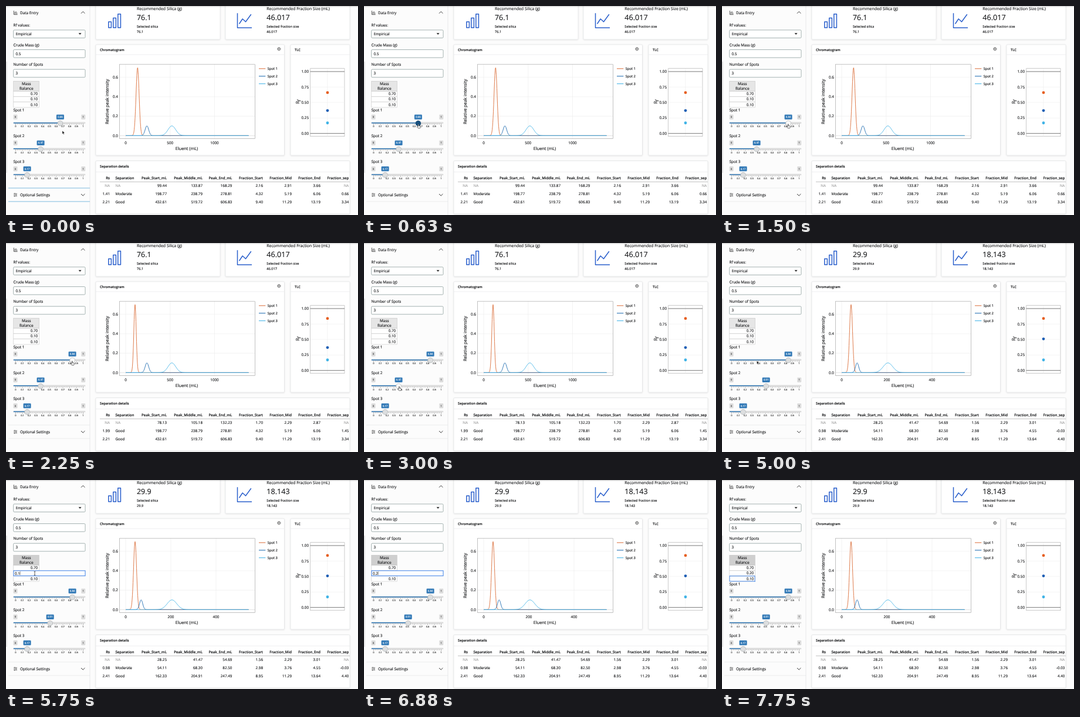
Animation of 600x357 px, one loop 8000 ms. Source, as an HTML page:

```html
<!DOCTYPE html>
<html lang="en">
<head>
<meta charset="utf-8">
<title>Chromatogram dashboard</title>
<style>
html, body { margin: 0; width: 100%; height: 100%; overflow: hidden; background: #fcfcfc; }
svg { display: block; width: 600px; height: 357px; font-family: "Open Sans", "Noto Sans", sans-serif; }
text { text-rendering: geometricPrecision; stroke-width: .14px; }
</style>
</head>
<body>
<svg id="stage" viewBox="0 0 600 357" xmlns="http://www.w3.org/2000/svg"></svg>
<script>
const LOOP = 8000;
const INK = '#17181a', BLUE = '#2b60cc', SLIDER = '#337ab7', FOCUS = '#4b89e8';
const COLORS = ['#dd7745', '#2470b3', '#45b5e8'];
const DOTS = ['#e65f1e', '#1f5fb5', '#3fb3e6'];
const HEIGHTS = [0.7, 0.1, 0.1];

// Markup helpers
const text = (x, y, s, size = 6.4, extra = '', color = INK) =>
  `<text x="${x}" y="${y}" font-size="${size}" fill="${color}" stroke="${color}" ${extra}>${s}</text>`;
const rect = (x, y, w, h, fill, extra = '') =>
  `<rect x="${x}" y="${y}" width="${w}" height="${h}" fill="${fill}" ${extra}/>`;
const line = (x1, y1, x2, y2, color, w = 0.6) =>
  `<path d="M${x1} ${y1}L${x2} ${y2}" stroke="${color}" stroke-width="${w}"/>`;
const path = (d, color, w = 1, extra = '') =>
  `<path d="${d}" fill="none" stroke="${color}" stroke-width="${w}" ${extra}/>`;
const circle = (x, y, r, fill, extra = '') =>
  `<circle cx="${x}" cy="${y}" r="${r}" fill="${fill}" ${extra}/>`;
const END = 'text-anchor="end"', MID = 'text-anchor="middle"', SEMI = 'font-weight="600"';

// Results for each set of slider values
const thirdRow = ['2.21', 'Good', 432.61, 519.72, 606.83, 9.40, 11.29, 13.19, '3.34'];
const first = {
  silica: '76.1', size: '46.017', rf: [0.66, 0.37, 0.17], scale: 0.1515, tick: 500,
  rows: [
    ['NA', 'NA', 99.44, 133.87, 168.29, 2.16, 2.91, 3.66, 'NA'],
    ['1.41', 'Moderate', 198.77, 238.79, 278.81, 4.32, 5.19, 6.06, '0.66'],
    thirdRow
  ]
};
const second = {
  ...first, rf: [0.84, 0.37, 0.17],
  rows: [
    ['NA', 'NA', 78.13, 105.18, 132.23, 1.70, 2.29, 2.87, 'NA'],
    ['1.99', 'Good', 198.77, 238.79, 278.81, 4.32, 5.19, 6.06, '1.45'],
    thirdRow
  ]
};
const third = {
  silica: '29.9', size: '18.143', rf: [0.84, 0.51, 0.17], scale: 0.385, tick: 200,
  rows: [
    ['NA', 'NA', 28.25, 41.47, 54.69, 1.56, 2.29, 3.01, 'NA'],
    ['0.98', 'Moderate', 54.11, 68.30, 82.50, 2.98, 3.76, 4.55, '-0.03'],
    ['2.41', 'Good', 162.33, 204.91, 247.49, 8.95, 11.29, 13.64, '4.40']
  ]
};

const COLUMNS = [
  ['Rs', 177], ['Separation', 186.5], ['Peak_Start_mL', 274], ['Peak_Middle_mL', 335],
  ['Peak_End_mL', 385.3], ['Fraction_Start', 438], ['Fraction_Mid', 487],
  ['Fraction_End', 536], ['Fraction_sep', 584.3]
];

function card(x, y, w, h, title, head = 17) {
  let s = rect(x, y, w, h, '#fff', 'rx="1.5" stroke="#dcdddf" stroke-width=".6" filter="url(#soft)"');
  if (title) s += line(x, y + head, x + w, y + head, '#e4e5e7') + text(x + 7, y + 11.2, title, 5.7, SEMI);
  return s;
}

function field(y, value) {
  return rect(12.7, y, 122.3, 13.6, '#fff', 'rx="1.5" stroke="#7f9391" stroke-width=".7"') +
    text(16.5, y + 9.1, value, 6.3);
}

function gear(x, y) {
  return circle(x, y, 2.1, 'none', 'stroke="#555" stroke-width=".8"') + circle(x, y, 0.8, '#555') +
    circle(x, y, 2.8, 'none', 'stroke="#555" stroke-width=".8" stroke-dasharray="1.1 1.1"');
}

const dividers = (color, w) => line(4, 311, 143, 311, color, w) + line(4, 334, 143, 334, color, w);

function sidebar() {
  return rect(0, 0, 143, 357, '#fcfcfc') + line(143, 0, 143, 357, '#d9dbdd') +
    rect(0, 95, 3, 190, 'url(#edge)') +
    path('M13.4 8v6.6h6.2M15.2 13.4v-3M17 13.4V9M18.7 13.4v-2', '#444', 0.9) +
    text(24, 13.7, 'Data Entry') +
    path('M128 12.7L131.2 9.5L134.4 12.7', '#222', 0.9) +
    text(12.5, 35, 'Rf values:') + field(41, 'Empirical') +
    '<path d="M123.6 46.2h5l-2.5 2.9z" fill="#222"/>' +
    text(12.5, 68.5, 'Crude Mass (g)') + field(74.6, '0.5') +
    text(12.5, 102.3, 'Number of Spots') + field(108.2, '3') +
    dividers('#e0e2e3', 0.6) +
    path('M13 320.4h6M13 322.6h6M13 324.8h6M15 319.4v2M17.3 321.6v2M14.6 323.8v2', '#444', 0.7) +
    text(24, 325, 'Optional Settings') +
    path('M128 321L131.2 324.2L134.4 321', '#222', 0.9);
}

function board() {
  let s = card(153, -20, 212, 77) + card(374, -20, 212, 77) +
    card(153, 66, 321.5, 189, 'Chromatogram') + card(485, 66, 101, 189, 'TLC') +
    card(153, 264.5, 433, 90.5, 'Separation details', 19) +
    text(223, 7.3, 'Recommended Silica (g)', 6.95) + text(444.3, 7.3, 'Recommended Fraction Size (mL)', 6.95) +
    text(223, 37.2, 'Selected silica', 5.65, 'font-weight="500"') +
    text(444.3, 37.2, 'Selected fraction size', 5.65, 'font-weight="500"') +
    path('M174.8 27h4.6v10h-4.6zM182.8 20.5h4.6v16.5h-4.6zM190.8 13.8h4.6v23.2h-4.6z', BLUE, 1.5, 'stroke-linejoin="round"') +
    path('M394.5 12.2V37.2H419M397.5 30.5L403.2 22L408.5 27L417.8 14.2', BLUE, 1.5, 'stroke-linejoin="round"') +
    gear(465.3, 73.4);

  // Chromatogram frame
  s += rect(193.3, 99.8, 231, 126.8, '#fff');
  for (let i = 0; i < 4; i++) {
    const y = 221.4 - 33.2 * i;
    s += line(193.3, y, 424.3, y, i ? '#ebebeb' : '#cfcfcf') + text(190.8, y + 2.2, (i / 5).toFixed(1), 6.3, END);
  }
  s += text(308, 245.8, 'Eluent (mL)', 7.3, MID) +
    text(0, 0, 'Relative peak intensity', 7.45, MID + ' transform="translate(174.8 163.4) rotate(-90)"');
  COLORS.forEach((c, i) => {
    const y = 107 + 12.9 * i;
    s += line(431, y, 442.3, y, c, 1.1) + text(445.8, y + 2.1, `Spot ${i + 1}`, 5.8);
  });

  // TLC plate frame
  s += rect(518.7, 106.7, 58.3, 116, '#fff', 'stroke="#a9a9a9" stroke-width=".6"') +
    line(548, 107, 548, 222.5, '#ececec');
  for (let i = 0; i <= 4; i++) {
    const y = plateY(i / 4), edge = i % 4 === 0;
    s += line(518.7, y, 577, y, edge ? '#555' : '#ececec', edge ? 0.8 : 0.6) +
      text(516, y + 2.2, (i / 4).toFixed(2), 6.3, END);
  }
  s += text(0, 0, 'R<tspan dy="1.5" font-size="6.2" font-style="italic">f</tspan>', 8.2,
    MID + ' transform="translate(499.8 163.8) rotate(-90)"');

  // Table head
  COLUMNS.forEach(([name, x], i) => { s += text(x, 295.6, name, 6.1, SEMI + (i === 1 ? '' : ' ' + END)); });
  return s + line(160, 300.4, 586, 300.4, '#999');
}

const plateY = v => 217.7 - 105.7 * v;

function results(d) {
  let s = text(223, 24.2, d.silica, 12.4) + text(444.3, 24.2, d.size, 12.6) +
    text(223, 45.6, d.silica, 5.7, 'font-weight="500"') + text(444.3, 45.6, d.size, 5.7, 'font-weight="500"');
  for (let i = 0; i < 3; i++) {
    const x = 204 + d.tick * i * d.scale;
    s += line(x, 99.8, x, 226.6, '#ebebeb') + text(x, 236, d.tick * i, 6.3, MID);
  }
  d.rows.forEach((row, i) => {
    const mid = row[3], sigma = (row[4] - row[2]) / 4;
    let p = '';
    for (let x = 0; x <= 209.5; x += 0.5) {
      const z = (x / d.scale - mid) / sigma;
      p += `${x ? 'L' : 'M'}${204 + x} ${(221.4 - 166 * HEIGHTS[i] * Math.exp(-z * z / 2)).toFixed(2)}`;
    }
    s += path(p, COLORS[i], 0.95, 'stroke-linejoin="round"') + circle(548, plateY(d.rf[i]), 2.4, DOTS[i]);
    row.forEach((v, k) => {
      const label = typeof v === 'number' ? v.toFixed(2) : v;
      s += text(COLUMNS[k][1], 309.4 + 13.7 * i, label, 6.25, k === 1 ? '' : END, label === 'NA' ? '#a3a3a3' : INK);
    });
  });
  return s + rect(193.3, 99.8, 231, 126.8, 'none', 'stroke="#999" stroke-width=".6"');
}

function slider(i, value, state) {
  const y = 199.7 + 44.2 * i, x = 16.5 + 115 * value;
  const tag = (cx, w, label, fill, ink) =>
    rect(cx - w / 2, y - 14.2, w, 8.3, fill, 'rx="1.2"') + text(cx, y - 8.5, label, 4.3, MID, ink);
  let s = text(12.5, y - 19.7, `Spot ${i + 1}`) +
    tag(16, 7, '0', '#dcdcdc', '#444') + tag(131.7, 7, '1', '#dcdcdc', '#444') +
    tag(x, 13, value.toFixed(2), SLIDER, '#fff') +
    rect(12.7, y - 0.9, 122.3, 1.7, '#e6e6e6', 'rx=".8" stroke="#b5b5b5" stroke-width=".4"') +
    rect(12.7, y - 0.8, x - 12.7, 1.5, SLIDER, 'rx=".7"');
  let ticks = '';
  for (let k = 0; k <= 40; k++) ticks += `M${16.5 + 2.875 * k} ${y + 1.2}v${k % 4 ? 1.5 : 2.6}`;
  s += path(ticks, '#444', 0.45);
  for (let k = 0; k <= 10; k++) s += text(16.5 + 11.5 * k, y + 7.6, k / 10, 4, MID, '#333');
  const fill = { idle: '#dcdedf', hover: '#fbfbfb', press: '#17507f' }[state];
  return s + circle(x, y + 0.6, 4.4, fill, `stroke="${state === 'press' ? '#123f66' : '#a5a8aa'}" stroke-width=".6"`);
}

function massTable(t) {
  const active = t >= 5250;
  const vals = ['0.70', t < 7500 ? '0.10' : '0.20', '0.10'];
  let s = rect(12.8, 128.5, 43.4, 17.3, active ? '#cfcfcf' : '#e6e6e6', 'stroke="#b9b9b9" stroke-width=".5"') +
    text(34.8, 135.1, 'Mass', 6.4, MID) + text(34.8, 142.8, 'Balance', 6.4, MID);
  s += vals.map((v, i) =>
    rect(12.8, 145.8 + 9.1 * i, 43.4, 9.1, '#fff', 'stroke="#bdbdbd" stroke-width=".5"') +
    text(54.2, 152.3 + 9.1 * i, v, 6.3, END)).join('');
  const select = y => rect(13, y, 43, 9, 'none', `stroke="${FOCUS}" stroke-width="1"`) +
    rect(55, y + 7.8, 2, 2, FOCUS, 'stroke="#fff" stroke-width=".3"');
  if (t >= 7500) s += select(164);
  else if (t >= 5500) {
    const typed = t < 5880 ? '0.1' : t < 6380 ? '0.' : '0.2';
    s += rect(13, 154.9, 122, 8.8, '#fff', `stroke="${FOCUS}" stroke-width="1.1"`) + text(15, 161.5, typed, 6.3);
    const x = typed === '0.' ? 20.5 : 24.2;
    if ((t - 5500) % 1000 < 500) s += line(x, 156.2, x, 162.4, '#111', 0.5);
  } else if (active) s += select(155);
  return s;
}

// Pointer: [time, x, y]
const MOVES = [
  [130, 96, 213], [480, 92.8, 201.7], [850, 92.8, 201.7], [1350, 112.8, 201.7],
  [2250, 112.8, 201.7], [2750, 60, 245], [3200, 60, 245], [3650, 75, 245],
  [3900, 75, 245], [4200, 74, 260], [4750, 74, 260], [5200, 49, 159.5]
];
const ease = p => p * p * (3 - 2 * p);
const progress = (t, a, b) => ease(Math.min(1, Math.max(0, (t - a) / (b - a))));
const between = (t, a, b) => t >= a && t < b;

function pointer(t) {
  if (t >= 5880) return '';
  let [, x, y] = MOVES[0];
  for (let i = 1; i < MOVES.length; i++) {
    const [start] = MOVES[i - 1], [end, ex, ey] = MOVES[i];
    const p = progress(t, start, end);
    x += (ex - x) * p;
    y += (ey - y) * p;
  }
  let shape;
  if (t >= 5130) shape = path('M-1.3-3.2Q0-3.2 0-2.4Q0-3.2 1.3-3.2M0-2.4V2.4M-1.3 3.2Q0 3.2 0 2.4Q0 3.2 1.3 3.2', '#111', 0.7);
  else if (between(t, 420, 2350) || between(t, 2680, 3980))
    shape = '<path d="M-.7 .5Q0-.4 .7 .5V3L3 3.6Q3.8 4 3.5 5L2.8 7H-.6L-2.7 4.6Q-2.5 3.6-1.5 4.2L-.7 4.8Z" fill="#fff" stroke="#111" stroke-width=".6" stroke-linejoin="round"/>';
  else shape = '<path d="M0 0V5.7L1.3 4.5L2.2 6.5L3.2 6L2.3 4.1H4.1Z" fill="#111" stroke="#fff" stroke-width=".4"/>';
  return `<g transform="translate(${x.toFixed(2)} ${y.toFixed(2)})">${shape}</g>`;
}

const stage = document.getElementById('stage');
stage.innerHTML = `<defs>
  <filter id="soft" x="-5%" y="-10%" width="110%" height="125%"><feDropShadow dx="0" dy=".8" stdDeviation="1" flood-opacity=".13"/></filter>
  <linearGradient id="edge"><stop stop-color="#000" stop-opacity=".12"/><stop offset="1" stop-color="#000" stop-opacity="0"/></linearGradient>
  <linearGradient id="top" x2="0" y2="1"><stop stop-color="#000" stop-opacity=".2"/><stop offset="1" stop-color="#000" stop-opacity="0"/></linearGradient>
</defs>${sidebar()}${board()}<g id="results"></g><g id="controls"></g>${rect(0, 0, 600, 2.5, 'url(#top)')}<g id="pointer"></g>`;

const cache = {};
function put(id, html) {
  if (cache[id] === html) return;
  cache[id] = html;
  document.getElementById(id).innerHTML = html;
}

const round = v => Math.round(v * 100) / 100;
const outputs = [first, second, third].map(results);

function draw(t) {
  put('results', outputs[t < 2250 ? 0 : t < 4500 ? 1 : 2]);
  const v1 = round(0.66 + 0.18 * progress(t, 850, 1350));
  const v2 = round(0.37 + 0.14 * progress(t, 3200, 3650));
  const s1 = between(t, 550, 1420) ? 'press' : between(t, 420, 2350) ? 'hover' : 'idle';
  const s2 = between(t, 3120, 3750) ? 'press' : between(t, 2680, 3980) ? 'hover' : 'idle';
  const glow = 1 - progress(t, 130, 400);
  const lines = glow ? `<g opacity="${glow.toFixed(2)}">${dividers('#86c1e6', 1.1)}</g>` : '';
  put('controls', slider(0, v1, s1) + slider(1, v2, s2) + slider(2, 0.17, 'idle') + massTable(t) + lines);
  put('pointer', pointer(t));
}

const begin = performance.now();
function tick() {
  draw((performance.now() - begin) % LOOP);
  requestAnimationFrame(tick);
}
tick();
</script>
</body>
</html>
```
